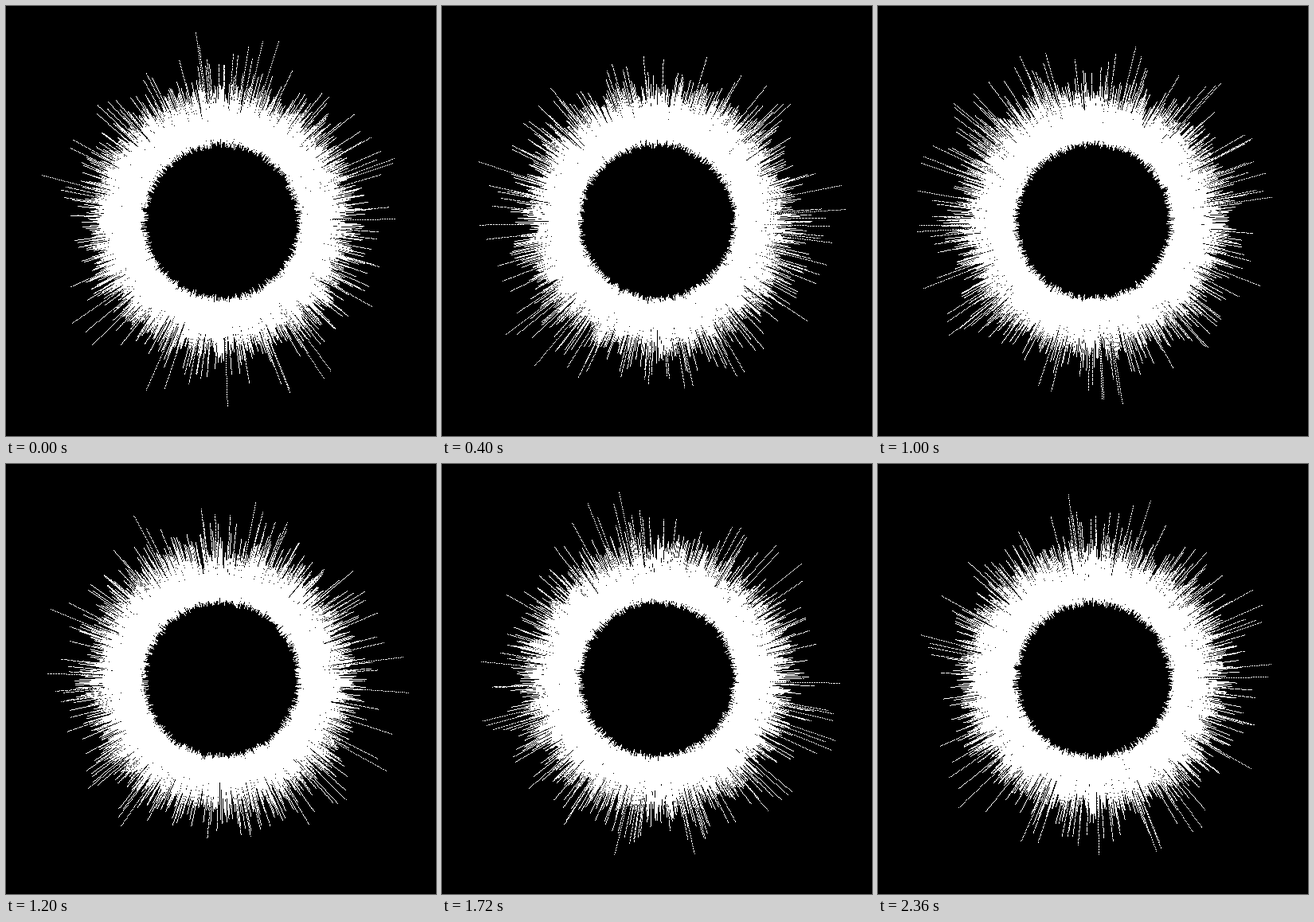
An HTML page with a canvas for the animation above (2.4 s loop, 540 by 540 pixels).

```html
<!DOCTYPE html>
<html lang="en">
<head>
<meta charset="utf-8">
<title>Corona</title>
<style>
  html, body { margin: 0; width: 100%; height: 100%; overflow: hidden; background: #000; }
  canvas { display: block; image-rendering: pixelated; }
</style>
</head>
<body>
<canvas id="stage" width="540" height="540"></canvas>
<script>
const SIZE = 540, CENTER = 270.5, LOOP = 2400, STEP = 40;
const RAYS = 1500, DOTS = 84, TAU = Math.PI * 2;
const WHITE = 0xffffffff, BLACK = 0xff000000;

let seed = 7;
function random() {
  seed = (Math.imul(seed, 1664525) + 1013904223) >>> 0;
  return seed / 4294967296;
}

const phases = () => [1, 2, 3].map(() => random() * TAU);

// Smooth noise from -3 to 3 that repeats with the loop.
const wave = (p, a) => Math.sin(a + p[0]) + Math.sin(2 * a + p[1]) + Math.sin(3 * a + p[2]);

const rays = Array.from({ length: RAYS }, (_, i) => {
  const angle = i / RAYS * TAU;
  return { cos: Math.cos(angle), sin: Math.sin(angle), inner: phases(), outer: phases() };
});

const innerRadius = w => 99.5 + 2.7 * w;

// Most rays end near the middle radius; the cubic term lets a few flare far out.
const outerRadius = w => 95 + 64 * Math.exp(0.17 * w + 0.012 * w ** 3);

const ctx = document.getElementById("stage").getContext("2d");
const image = ctx.createImageData(SIZE, SIZE);
const pixels = new Uint32Array(image.data.buffer);

function draw(now) {
  const a = now / LOOP * TAU;
  pixels.fill(BLACK);
  for (const ray of rays) {
    const inner = innerRadius(wave(ray.inner, a));
    const outer = outerRadius(wave(ray.outer, a));
    for (let i = 0; i <= DOTS; i++) {
      const r = inner + (outer - inner) * i / DOTS;
      const x = Math.floor(CENTER + r * ray.cos), y = Math.floor(CENTER + r * ray.sin);
      pixels[y * SIZE + x] = WHITE;
    }
  }
  ctx.putImageData(image, 0, 0);
}

let shown = -1;
function tick() {
  const now = Math.floor(performance.now() % LOOP / STEP) * STEP;
  if (now !== shown) draw(shown = now);
  requestAnimationFrame(tick);
}
tick();
</script>
</body>
</html>
```
